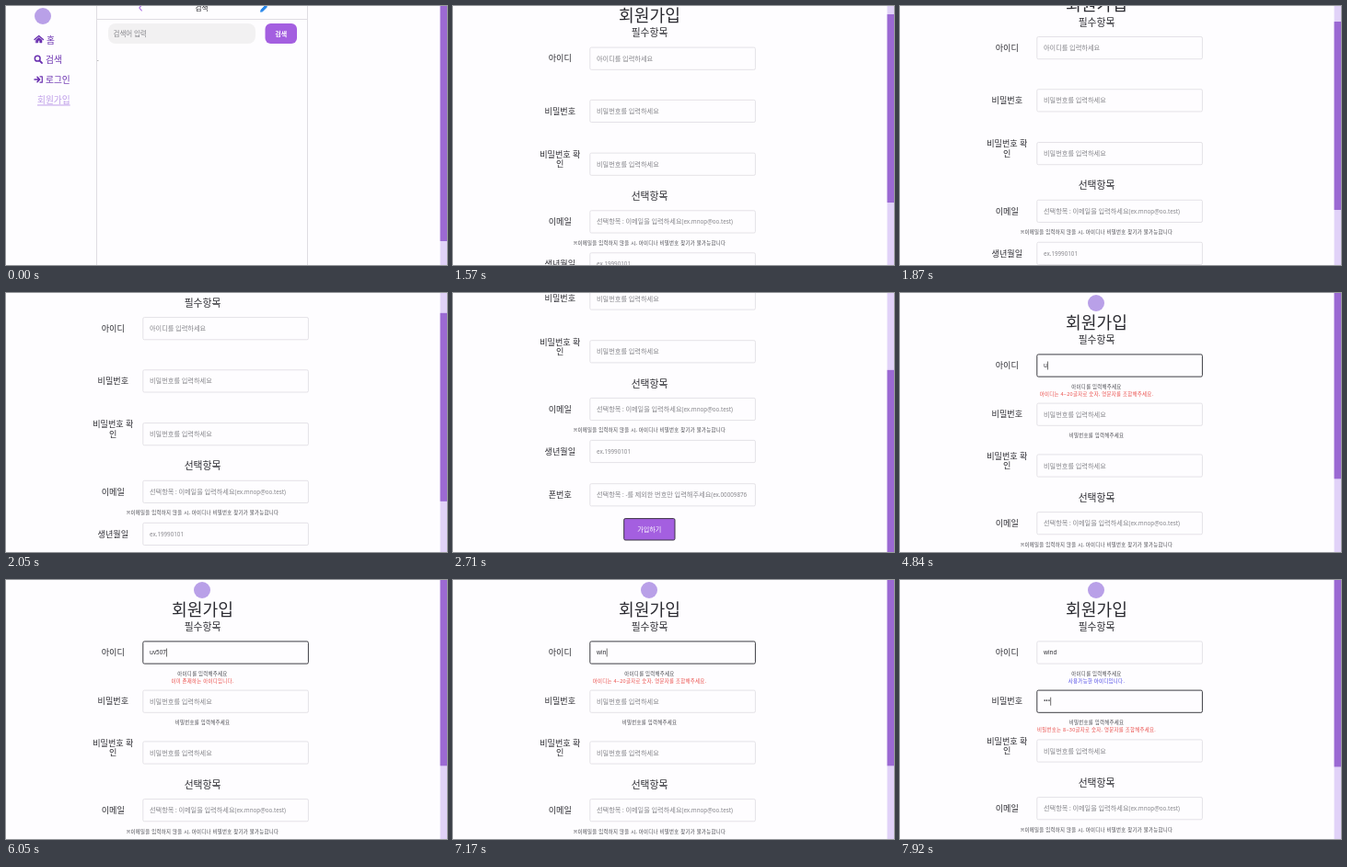
Write an HTML page that moves like this. It is 479 px wide and 282 px high and loops after 8000 ms.

```html
<!DOCTYPE html>
<html lang="ko">
<head>
<meta charset="utf-8">
<title>회원가입</title>
<style>
  html, body { margin: 0; width: 100%; height: 100%; overflow: hidden; background: #fefdff; }
  svg { display: block; width: 479px; height: 282px; font-family: "Noto Sans", "Noto Sans CJK KR", "Noto Sans KR", "Noto Sans CJK JP", sans-serif; }
  .note { letter-spacing: .055em; }
  .light { font-weight: 300; }
</style>
</head>
<body>
<svg id="stage" viewBox="0 0 479 282"></svg>
<script>
const LOOP = 8000, STEP = 60, SCROLL_START = 1570;
const INK = '#2b2b31', NOTE = '#46464c', HINT = '#85858a', RED = '#ea4a46', BLUE = '#4640e4';
const PURPLE = '#a45fe0', DEEP = '#6a30b0', LOGO = '#b9a0e8';
const TAKEN = 'uv507';

const stage = document.getElementById('stage');

// [time, value] pairs; the latest one reached holds
const ID_KEYS = [[0, ''], [4780, 'u'], [4960, 'uv'], [5290, 'uv5'], [5350, 'uv50'], [5470, TAKEN],
  [6240, 'uv50'], [6300, 'uv5'], [6360, 'uv'], [6420, 'u'], [6490, ''],
  [6730, 'w'], [7050, 'wi'], [7170, 'win'], [7350, 'wind']];
const PW_KEYS = [[0, ''], [7670, '•'], [7790, '••'], [7920, '•••']];
const CARET = [[0, 0], [4050, 1], [4450, 0], [4780, 1], [5730, 0], [6050, 1]];
const SCROLL = [[1510, 0], [1570, 21.8], [2050, 40.3], [2350, 98], [2590, 130.2],
  [2710, 130.2], [2770, 90], [2830, 32], [2890, 0]];

const held = (keys, t) => keys.filter(k => k[0] <= t).pop()[1];

function scrollAt(t) {
  t = SCROLL_START + Math.floor((t - SCROLL_START) / STEP) * STEP;
  const i = SCROLL.findIndex(k => k[0] > t);
  if (i < 1) return 0;
  const [a, from] = SCROLL[i - 1], [b, to] = SCROLL[i];
  return from + (to - from) * (t - a) / (b - a);
}

const rect = (x, y, w, h, fill, more = '') =>
  `<rect x="${x}" y="${y}" width="${w}" height="${h}" fill="${fill}" ${more}/>`;

// y is the vertical middle of the text
const text = (s, x, y, size, fill = INK, more = 'text-anchor="middle"') =>
  `<text x="${x}" y="${y + size * .36}" font-size="${size}" fill="${fill}" ${more}>${s}</text>`;

const heading = (s, y, size) => text(s, 213.5, y, size, INK, 'text-anchor="middle" class="light"');
const note = (s, y, fill = NOTE) => text(s, 213.5, y, 5.4, fill, 'text-anchor="middle" class="note"');

// Latin runs are set a little smaller than Hangul
const mixed = (s, size) => s.replace(/[ -~]+/g, run => `<tspan font-size="${size * .87}">${run}</tspan>`);

const path = (d, stroke, width, fill = 'none') =>
  `<path d="${d}" stroke="${stroke}" stroke-width="${width}" fill="${fill}" stroke-linecap="round" stroke-linejoin="round"/>`;

const logo = x => `<circle cx="${x}" cy="11" r="9" fill="${LOGO}"/>`;
const scrollbar = (y, h) => rect(471.6, 0, 8, 282, '#e1d2f8') + rect(471.6, y, 8, h, '#9b69d3');

function searchPage() {
  const item = (s, x, y) => text(s, x, y, 9.7, DEEP, 'font-weight="500"');
  return logo(40) +
    path('M31 36.5L35.7 32.5L40.4 36.5', DEEP, 1.4) +
    path('M32.5 37L35.7 34.3L39 37V40H36.7V37.8H34.8V40H32.5Z', DEEP, .5, DEEP) +
    `<circle cx="34.2" cy="57.2" r="2.9" fill="none" stroke="${DEEP}" stroke-width="1.5"/>` +
    path('M36.6 59.6L39 62', DEEP, 1.8) +
    path('M31 80H35.6M34 77.4L36.6 80L34 82.6', DEEP, 1.5) + path('M37 76.8H39.3V83.2H37', DEEP, 1.2) +
    item('홈', 44, 38) + item('검색', 43, 59) + item('로그인', 43, 81) +
    text('회원가입', 34, 103, 9.7, '#bd9ce8', 'text-decoration="underline"') +
    path('M98.5 0V282M327.5 0V282M99 14.5H327', '#dfdde2', 1) +
    rect(99, 59, 1.5, 1, '#bbb') +
    path('M147.3 -1L144.8 2L147.3 5', PURPLE, 1.1) +
    text('검색', 212.5, 2.5, 7.6, INK, 'text-anchor="middle" font-weight="500"') +
    path('M276.6 6L277.1 3.9L281.8 -.8L283.6 1L278.8 5.7Z', '#2384ea', .8, '#2384ea') +
    rect(111, 19, 160, 22, '#f2f1f2', 'rx="8"') +
    text(mixed('검색어 입력', 7.5), 116.5, 30, 7.5, HINT, '') +
    rect(281.5, 19, 34.5, 22, PURPLE, 'rx="6"') +
    text('검색', 298.8, 30, 7, '#fff', 'text-anchor="middle" font-weight="700"') +
    scrollbar(-9, 265);
}

function field(y, hint, value = '', focus = false) {
  const shown = value ? text(value, 156, y, 6.3, INK, focus ? 'id="typed"' : '')
                      : text(mixed(hint, 7.2), 156, y, 7.2, HINT, '');
  return rect(148.8, y - 12.1, 179.6, 24.2, '#fefdff',
    `rx="1.5" stroke="${focus ? '#3c3c42' : '#e4e2e7'}" stroke-width="1"`) + shown;
}

function idMessage(id) {
  if (id === TAKEN) return ['이미 존재하는 아이디입니다.', RED];
  return id.length < 4 ? ['아이디는 4~20글자로 숫자, 영문자를 조합해주세요.', RED]
                       : ['사용가능한 아이디입니다.', BLUE];
}

function signupPage(t) {
  const id = held(ID_KEYS, t), pw = held(PW_KEYS, t);
  const sent = t >= 2770, idFocus = t >= 4050 && t < 7550, pwFocus = t >= 7550;
  const idNotes = sent ? [['아이디를 입력해주세요']] : [];
  const pwNotes = sent ? [['비밀번호를 입력해주세요']] : [];
  if (t >= 4780) idNotes.push(idMessage(id));
  if (pw) pwNotes.push(['비밀번호는 8~30글자로 숫자, 영문자를 조합해주세요.', RED]);

  // every note pulls the rows below it up by 2
  const count = idNotes.length + pwNotes.length;
  const idY = 79, pwY = 136.2 - 2 * idNotes.length, low = -2 * count;
  const scroll = scrollAt(t);
  const label = (s, y) => text(s, 116.3, y, 9.1);
  const notes = (list, y) => list.map(([s, fill], i) => note(s, y + 22.7 + 8 * i, fill)).join('');
  const pressed = t >= 2650 && !idFocus && !pwFocus;

  return `<g transform="translate(0 ${-scroll})">` +
    logo(213) + heading('회원가입', 32.2, 18.2) + heading('필수항목', 51, 10.8) +
    label('아이디', idY) + field(idY, '아이디를 입력하세요', id, idFocus) + notes(idNotes, idY) +
    label('비밀번호', pwY) + field(pwY, '비밀번호를 입력하세요', pw, pwFocus) + notes(pwNotes, pwY) +
    `<g transform="translate(0 ${low})">` +
    label('비밀번호 확', 183.5) + label('인', 193.7) + field(194, '비밀번호를 입력하세요') +
    heading('선택항목', 228.9, 10.8) +
    label('이메일', 256.7) + field(256.7, '선택항목 : 이메일을 입력하세요(ex.mnop@oo.test)') +
    note('※이메일을 입력하지 않을 시, 아이디나 비밀번호 찾기가 불가능합니다', 279.6) +
    label('생년월일', 302.7) + field(302.7, 'ex.19990101') +
    label('폰번호', 350) + field(350, '선택항목 : -를 제외한 번호만 입력해주세요(ex.00009876') +
    rect(185.7, 375.8, 55.3, 23.4, PURPLE, `rx="1.5" stroke="${pressed ? '#3c3444' : PURPLE}" stroke-width="1"`) +
    text('가입하기', 213.3, 387.5, 7.1, '#fff', 'text-anchor="middle" font-weight="500"') +
    '</g>' +
    (held(CARET, t) ? rect(156, (pwFocus ? pwY : idY) - 4.5, .7, 9, '#333', 'id="caret"') : '') +
    '</g>' + scrollbar(-6 + .69 * scroll, 205 + 1.1 * count);
}

let last = '';
function draw(now) {
  const t = now % LOOP;
  const html = t < 450 ? searchPage() : signupPage(t);
  if (html !== last) {
    stage.innerHTML = last = html;
    const caret = stage.querySelector('#caret'), typed = stage.querySelector('#typed');
    if (caret && typed) caret.setAttribute('x', 156.3 + typed.getComputedTextLength());
  }
  requestAnimationFrame(draw);
}
draw(performance.now());
</script>
</body>
</html>
```
